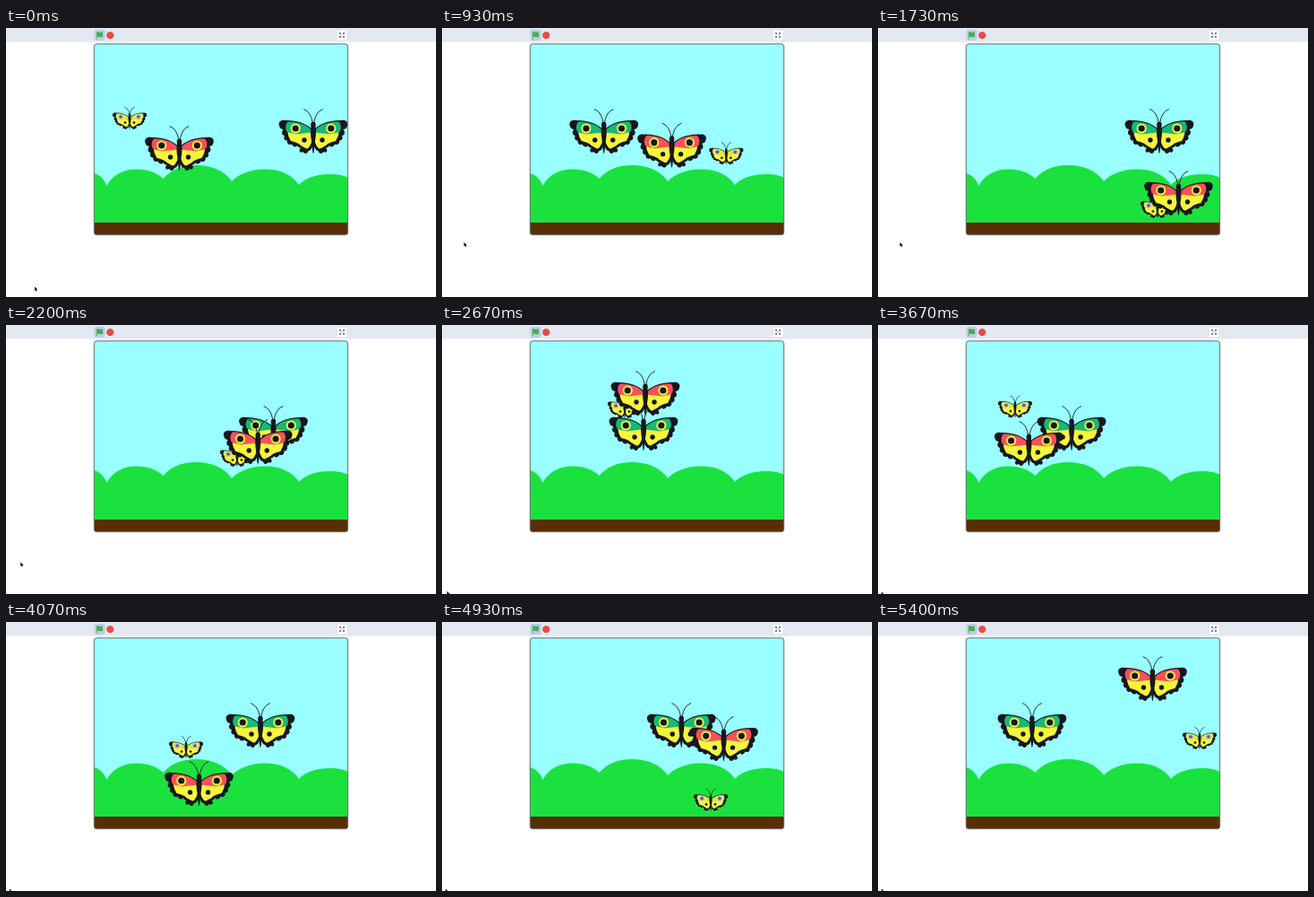
These frames come from a looping animation (480x300 px, 5.47 s). An HTML page with a canvas:

```html
<!DOCTYPE html>
<html lang="en">
<head>
<meta charset="utf-8">
<title>Butterflies</title>
<style>
html, body { margin: 0; width: 100%; height: 100%; overflow: hidden; background: #fff; }
canvas { display: block; width: 480px; height: 300px; }
</style>
</head>
<body>
<canvas id="stage"></canvas>
<script>
const canvas = document.getElementById('stage');
const ctx = canvas.getContext('2d');
const ratio = window.devicePixelRatio || 1;
canvas.width = 480 * ratio;
canvas.height = 300 * ratio;

const LOOP = 5470, TICKS = 82;
const INK = '#17171f', YELLOW = '#f5f53c';

// Distance travelled along each axis: tick, green x, red x, red y, small x, small y
const LAP = [383, 270, 274, 275, 275];
const part = (tick, share) => [tick, ...LAP.map(d => d * share)];
const travel = [
  part(0, 0), part(3, 0), part(4, .18), part(5, .21), part(7, .21),
  part(8, .382), part(9, .382), part(15, .706), part(20, .706), part(21, .846),
  part(26, 1),
  [40, 530, 378.5, 382, 383, 383],
  [48, 618, 445, 448, 449, 448],
  [61, 765, 547, 552, 553, 553],
  [62, 765, 547, 552, 553, 553],
  [74, 912, 655, 661, 661, 659],
  [81, 995, 711, 719, 718, 719]
];
const pointer = [
  [0, 32, 288.5], [2, 28, 248], [3, 28, 248], [5, 24.5, 239],
  [29, 24.5, 239], [38, 6, 296.5], [47, 4, 297.5], [81, 4, 297.5]
];

function sample(keys, tick) {
  let i = 0;
  while (i < keys.length - 2 && keys[i + 1][0] <= tick) i++;
  const a = keys[i], b = keys[i + 1];
  const p = Math.min(1, (tick - a[0]) / (b[0] - a[0]));
  return a.slice(1).map((v, j) => v + (b[j + 1] - v) * p);
}

// Position after bouncing between lo and hi
function bounce(start, dir, dist, lo, hi) {
  const span = hi - lo;
  const u = dir > 0 ? start - lo + dist : 2 * span - (start - lo) + dist;
  const m = u % (2 * span);
  return lo + (m < span ? m : 2 * span - m);
}

function disc(x, y, r, color) {
  ctx.fillStyle = color;
  ctx.beginPath();
  ctx.arc(x, y, r, 0, 7);
  ctx.fill();
}

function shape(path, color) {
  ctx.fillStyle = color;
  ctx.fill(path);
}

function stroke(path, color, width) {
  ctx.strokeStyle = color;
  ctx.lineWidth = width;
  ctx.stroke(path);
}

const wing = new Path2D('M1 23C8 16 20 12.5 31 13C36 12 39.500 15 38 19C37.500 22 35 23 33.500 23C36 26 35 30 32 30C33.500 33 32 36 29 35.500C30 39 27 41 24 39.500C23 43 19 43.500 18 41C17 43 15.500 43.500 14 43.500C17 47 14.500 50 11.500 48C9 51.500 6 49.500 5.500 47C3.500 47 2 45 1 42Z');
const upper = new Path2D('M1.500 24C8 17.500 18 14 28.500 14.500C31 17 31.500 21 30 25C27 27.500 23 29 18 30L1.500 26.500Z');
const lower = new Path2D('M1.500 26.500L19 28.500C23 27.500 26 27 28.500 26C28.500 30 26.500 33 25 36C21 37 17 38 14 41C11 42.500 9 44.500 6.500 44.500C4 43 2.500 39 1.500 36Z');
const feeler = new Path2D('M.6 17C1.500 10 4 3 10.800 .6');
const torso = new Path2D('M0 14.500C3 14.500 3 18 2.500 20C3.500 25 3 30 2 36C1.500 42 1 48 0 50.500C-1 48 -1.500 42 -2 36C-3 30 -3.500 25 -2.500 20C-3 18 -3 14.500 0 14.500Z');

function butterfly(x, y, scale, top, ring) {
  ctx.save();
  ctx.translate(x, y);
  ctx.scale(scale, scale);
  for (const side of [-1, 1]) {
    ctx.save();
    ctx.scale(side, 1);
    shape(wing, INK);
    shape(upper, top);
    shape(lower, YELLOW);
    disc(19.8, 22, 5.6, ring);
    disc(19.8, 22, 3.6, scale < 1 ? '#6c4a9c' : INK);
    disc(10, 35, 2.7, INK);
    stroke(feeler, INK, scale < 1 ? 1.3 : .9);
    ctx.restore();
  }
  shape(torso, INK);
  ctx.restore();
}

const hills = new Path2D('M98 162C104 163 110 169 112.500 176C119 163 132 157.500 146 157.500C158 157.500 168 161 175.500 168C184 158 197 153 212 153C229 153 244 159 252 171C261 162 274 157.500 289 157.500C305 157.500 319 163 327 175C334 167 347 163 362 163C370 163 377 164.500 382 167V218H98Z');
const frame = new Path2D();
frame.roundRect(98.3, 17.8, 283.4, 212.9, 3);
const flag = new Path2D('M101 4.500C103 3.500 104 5.500 108 4.500V10C104.500 11 103.500 9 101.800 10V12.500H101Z');
const stopSign = new Path2D('M114.500 4.200H118L120.200 6.400V9.800L118 12H114.500L112.300 9.800V6.400Z');
const corners = new Path2D('M372.500 7V5.500H374M376 5.500H377.500V7M377.500 9V10.500H376M374 10.500H372.500V9M372.500 5.500L374.300 7.300M377.500 5.500L375.700 7.300M377.500 10.500L375.700 8.700M372.500 10.500L374.300 8.700');
const arrow = new Path2D('M0 0V4.600L1.100 3.700L1.900 5.200L2.700 4.800L2 3.300H3.300Z');

function toolbar() {
  ctx.fillStyle = '#e4e8f1';
  ctx.fillRect(0, 0, 480, 15.5);
  ctx.fillStyle = '#b9cdf0';
  ctx.beginPath();
  ctx.roundRect(98.5, 2, 12, 12, 2);
  ctx.fill();
  shape(flag, '#4cad4c');
  shape(stopSign, '#e84a48');
  ctx.beginPath();
  ctx.roundRect(369.3, 2.3, 11.8, 11.6, 2);
  ctx.fillStyle = '#fff';
  ctx.fill();
  ctx.strokeStyle = '#d6dae4';
  ctx.lineWidth = .6;
  ctx.stroke();
  stroke(corners, '#5b6070', .8);
}

function draw(ms) {
  const tick = Math.min(TICKS - 1, Math.floor((ms + 5) / LOOP * TICKS));
  const [g, rx, ry, sx, sy] = sample(travel, tick);
  const [px, py] = sample(pointer, tick);

  ctx.setTransform(ratio, 0, 0, ratio, 0, 0);
  ctx.fillStyle = '#fff';
  ctx.fillRect(0, 0, 480, 300);
  toolbar();

  ctx.save();
  ctx.clip(frame);
  ctx.fillStyle = '#99ffff';
  ctx.fillRect(98, 17, 285, 214);
  shape(hills, '#1be13f');
  ctx.fillStyle = '#5a2e05';
  ctx.fillRect(98, 217, 285, 14);
  butterfly(bounce(138, 1, sx, 117.5, 362.5), bounce(88, -1, sy, 18, 205), .5, '#d3ee45', '#c9c4d8');
  butterfly(bounce(343, -1, g, 137, 343), 90, 1, '#18b877', YELLOW);
  butterfly(bounce(193.5, -1, rx, 137, 343), bounce(109, -1, ry, 18, 180), 1, '#fb4f5b', YELLOW);
  ctx.restore();
  stroke(frame, '#686c72', 1);

  ctx.save();
  ctx.translate(px, py);
  shape(arrow, '#000');
  ctx.restore();
}

const start = performance.now();
function loop() {
  draw((performance.now() - start) % LOOP);
  requestAnimationFrame(loop);
}
loop();
</script>
</body>
</html>
```
